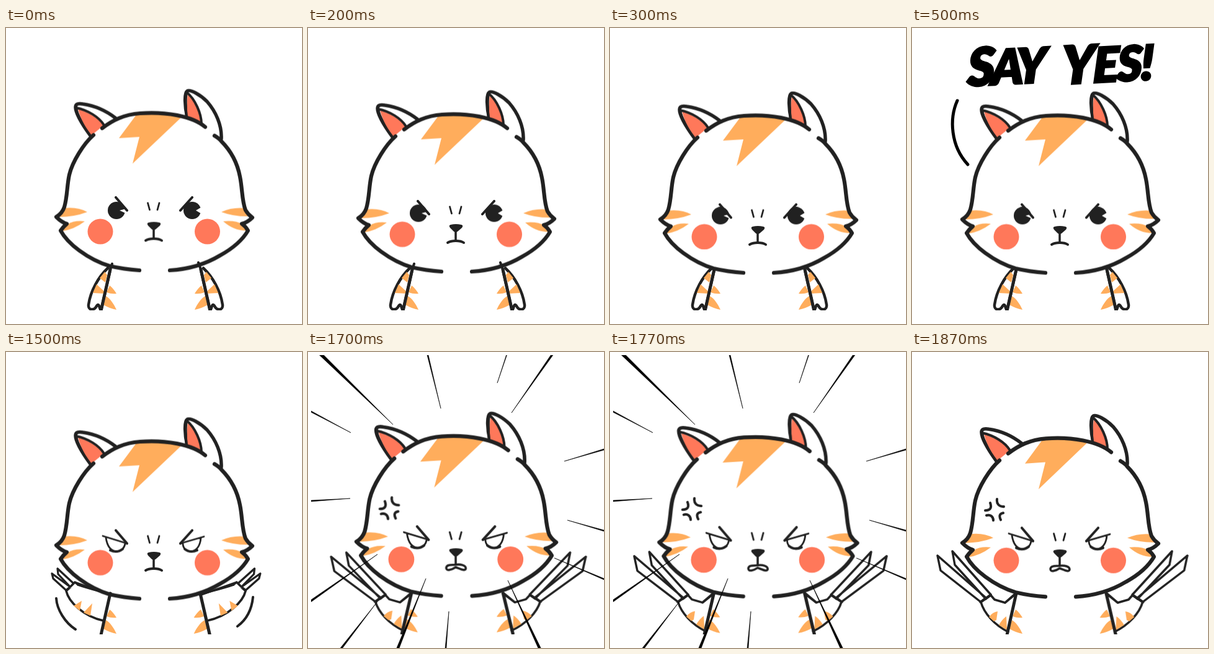
An HTML page that plays this animation: 477 by 477 pixels, repeating every 2870 ms.

```html
<!DOCTYPE html>
<html lang="en">
<head>
<meta charset="utf-8">
<title>Say yes</title>
<style>
html, body { margin: 0; width: 100%; height: 100%; overflow: hidden; background: #fff; }
svg { display: block; width: 100vw; height: 100vh; }
g { animation: 2870ms step-end infinite; }

.line { fill: none; stroke: #212121; stroke-linecap: round; stroke-linejoin: round; }
.ink { fill: #212121; }
.skin { fill: #fff; stroke: #212121; stroke-linecap: round; stroke-linejoin: round; }
.orange { fill: #ffad5c; }
.coral { fill: #ff785a; }
.words text { font: italic 900 85px Lato, "Open Sans", sans-serif; stroke: #000; stroke-width: 3; letter-spacing: -3px; }
.words .tight { letter-spacing: -6px; }
.words tspan { font-size: 78px; }

.calm { animation-name: calm; }
.swing { animation-name: swing; }
.fierce { animation-name: fierce; }
.closed { animation-name: closed; }
.squint { animation-name: squint; }
.words { animation-name: words; }
.rays { animation-name: rays; }
.high { animation-name: high; }
.head { animation-name: head; }
.face { animation-name: face; }
.nose { animation-name: nose; }
.brow { animation-name: brow; }
.arms { animation-name: arms; }

@keyframes calm { 0% { visibility: visible } 52.2648%, 100% { visibility: hidden } }
@keyframes swing { 0% { visibility: hidden } 52.2648% { visibility: visible } 59.2334%, 100% { visibility: hidden } }
@keyframes fierce { 0% { visibility: hidden } 59.2334%, 100% { visibility: visible } }
@keyframes closed { 0% { visibility: visible } 59.2334%, 100% { visibility: hidden } }
@keyframes squint { 0% { visibility: hidden } 52.2648%, 100% { visibility: visible } }
@keyframes words { 0% { visibility: hidden } 17.4216% { visibility: visible } 52.2648%, 100% { visibility: hidden } }
@keyframes rays { 0% { visibility: hidden } 59.2334% { visibility: visible } 65.1567%, 100% { visibility: hidden } }
@keyframes high { 0% { visibility: visible } 10.4529%, 100% { visibility: hidden } }

@keyframes head {
  0% { transform: translateY(-3.5px) }
  6.9686% { transform: translateY(-1.5px) }
  10.4529% { transform: translateY(.5px) }
  52.2648% { transform: translateY(3.5px) }
  59.2334% { transform: matrix(1.019, 0, 0, 1.0157, -4.53, -7.2) }
  61.6724% { transform: matrix(1.01, 0, 0, 1.012, -2.4, -5) }
  65.1567%, 100% { transform: matrix(1, 0, 0, 1.008, 0, -2.8) }
}
@keyframes face { 0% { transform: translateY(-4.5px) } 6.9686% { transform: translateY(-2px) } 10.4529%, 100% { transform: none } }
@keyframes nose { 0% { transform: translateY(-2px) } 6.9686% { transform: translateY(-.5px) } 10.4529%, 100% { transform: translateY(.5px) } }
@keyframes brow { 0% { transform: translateY(-3px) } 6.9686% { transform: translateY(-1.5px) } 10.4529%, 100% { transform: none } }
@keyframes arms {
  0% { transform: none }
  59.2334% { transform: matrix(1.019, 0, 0, .968, -4.53, 12.3) }
  61.6724% { transform: matrix(1.01, 0, 0, .984, -2.4, 6.2) }
  65.1567%, 100% { transform: none }
}
</style>
</head>
<body>
<svg viewBox="0 0 477 477">
<defs>
  <clipPath id="floor"><path d="M0 0H477V455H0Z"/></clipPath>
  <clipPath id="inset"><path d="M5 5H477V477H5Z"/></clipPath>

  <g id="side">
    <path class="orange" d="M167 415C171 418 175 423 178 428Q170 429 162 426ZM161 432C168 436 174 445 178 454Q167 452 157 446Z"/>
    <path class="line" stroke-width="5" d="M168 389L153 456"/>
  </g>
  <g id="armDown">
    <path class="skin" stroke-width="4.500" d="M164 387C149 401 136 424 133 446C132 455 142 456 146 448Q149 443 151 451L153 456L168 390"/>
    <path class="orange" d="M151 403L159 393L163 398L160 410ZM140 427L146 413L160 426L159 428Z"/>
    <use href="#side"/>
  </g>
  <g id="armUp">
    <path class="skin" stroke-width="3.500" d="M168 391C148 383 128 381 111 373L97 385C101 403 125 426 157 433"/>
    <path class="line" stroke-width="3" d="M111 371L166 391"/>
    <path class="orange" d="M109 409L122 401L119 417ZM125 420L139 405L136 425Z"/>
    <path class="skin" stroke-width="3.200" d="M83 349L84 358L104 379L110 374ZM74 357L76 365L97 384L104 379Z"/>
    <path class="skin" stroke-width="3.500" d="M97 384L105 377L111 371L116 375"/>
    <use href="#side"/>
  </g>
  <g id="armClaw">
    <path class="skin" stroke-width="3.500" d="M168 388L150 404L133 399L127 392L111 403C116 421 133 440 155 451"/>
    <path class="orange" d="M124 427Q130 419 138 418L136 432L132 434ZM140 440Q145 431 152 426L153 448Z"/>
    <path class="skin" stroke-width="3.400" d="M65 321L69 343L119 398L127 391ZM41 328L46 352L111 403L119 396Z"/>
    <path class="line" stroke-width="3.500" d="M110 403L127 391M150 404L166 391"/>
    <use href="#side"/>
  </g>
</defs>

<g clip-path="url(#floor)">
  <g class="arms">
    <g class="calm"><use href="#armDown"/><use href="#armDown" transform="matrix(-1 0 0 1 482 0)"/></g>
    <g class="swing">
      <use href="#armUp"/><use href="#armUp" transform="matrix(-1.030 0 0 1 486 0)"/>
      <path class="line" stroke-width="4" d="M81 397C82 415 95 436 112 447M398 395C396 415 388 431 373 442"/>
    </g>
    <g class="fierce"><use href="#armClaw"/><use href="#armClaw" transform="matrix(-1.030 0 0 1 486 0)"/></g>
  </g>
</g>
<g class="high"><path class="line" stroke-width="4" d="M168 389L171 380M314 389L310 378"/></g>

<g class="head">
  <path class="skin" stroke-width="5.500" d="M136 177C128 166 112 142 112 131C112 125 118 125 124 126C145 129 163 138 177 149"/>
  <path class="skin" stroke-width="5.500" d="M292 147C288 130 287 108 292 105C297 102 313 111 324 122C338 138 348 160 347 182"/>
  <path class="coral" d="M116 134C120 150 130 167 137 177L158 160C148 147 130 139 116 134ZM293 109C291 125 292 138 293 148L315 158C314 140 304 115 293 109Z"/>
  <path class="line" stroke-width="4" d="M136 177C126 164 115 146 113 132C132 136 150 147 158 160M291 147C289 132 289 118 291 107C305 118 315 142 315 158"/>

  <path class="orange" d="M211 142Q250 138 282 148L204 222L215 179L182 181Z"/>
  <path class="orange" d="M92 294Q115 291 131 300Q110 308 86 308ZM127 315Q110 313 99 320L90 331Q110 328 127 315ZM347 300Q365 292 385 294L394 307Q368 308 347 300ZM350 315Q370 313 381 320L389 330Q368 331 350 315Z"/>

  <path class="line" stroke-width="6.200" d="M141 176C125 190 107 219 102 240C98 258 99 275 94 292C91 301 86 305 81 308Q90 317 98 319Q92 324 88 330C94 341 103 351 118 362C133 373 150 382 167 387C184 391 200 393 215 394"/>
  <path class="line" stroke-width="6.200" d="M155 165C172 152 190 143 216 141C256 138 300 145 321 163"/>
  <path class="line" stroke-width="6.200" d="M336 177C341 180 345 183 347 186C364 203 373 222 377 243C381 262 380 282 386 297Q390 304 397 309Q389 317 380 319Q386 323 390 330C380 347 365 359 345 370C325 382 300 392 264 394"/>

  <g class="face">
    <circle class="coral" cx="152" cy="336" r="20.5"/>
    <circle class="coral" cx="324.500" cy="336" r="20.5"/>
    <g class="calm">
      <circle class="ink" cx="178" cy="302" r="14"/>
      <circle class="ink" cx="300" cy="302" r="14"/>
      <path fill="#fff" d="M183 302L194 299V307ZM306 302L316 296V308Z"/>
    </g>
    <g class="squint">
      <path class="line" stroke-width="2.800" d="M156 293L195 305M319 294L281 305M161 296C163 309 169 317 178 318C186 318 191 312 192 305M285 305C285 312 290 318 298 318C307 317 313 309 314 296"/>
      <path class="line" stroke-width="4" d="M168 316Q179 321 188 314M288 314Q297 321 308 316"/>
    </g>
    <g class="brow">
      <path class="line" stroke-width="4" d="M177 284L195 305M300 284L281 305"/>
      <path class="line" stroke-width="2.800" d="M228.500 293L231.500 304M247 293L244 304"/>
    </g>
  </g>

  <g class="nose">
    <path class="ink" d="M230 319Q238 317 247 319Q251 320 248 324L241 330Q238 332 235 330L229 324Q226 320 230 319Z"/>
    <path class="line" stroke-width="3.500" d="M238 328V344"/>
    <g class="closed"><path class="line" stroke-width="3.800" d="M225 348Q230 345 238 345Q247 345 251 348"/></g>
    <g class="fierce"><path class="skin" stroke-width="3.500" d="M223 349C224 343 232 345 238 344C246 343 254 345 254 350C253 355 246 351 238 348C232 352 223 355 223 349Z"/></g>
  </g>

  <g class="fierce">
    <path class="line" stroke-width="4" d="M126 244C129 252 126 256 118 256M137 238C136 245 140 250 148 250M120 264C126 262 131 266 131 272M147 260C141 261 140 265 143 271"/>
  </g>
</g>

<g class="rays" clip-path="url(#inset)"><path id="rays"/></g>

<g class="words">
  <text class="tight" transform="translate(89 94) rotate(-3) skewX(-4)">S<tspan>AY</tspan></text>
  <text transform="translate(241 91) rotate(-3) skewX(-4)">Y<tspan>ES!</tspan></text>
  <path fill="none" stroke="#000" stroke-width="5" stroke-linecap="round" d="M73 117C60 146 62 190 90 220"/>
</g>
</svg>
<script>
// Tapered streaks: outer x, y, inner x, y, outer width
const streaks = [
  [22, 5, 137, 117, 5], [193, 5, 214, 91, 2], [320, 5, 305, 50, 1], [393, 5, 328, 98, 3],
  [5, 96, 69, 130, 2], [5, 240, 68, 236, 2], [477, 157, 413, 176, 2], [477, 288, 418, 271, 2],
  [477, 366, 397, 332, 2], [5, 401, 112, 326, 3], [54, 477, 112, 402, 3], [145, 477, 190, 365, 4],
  [222, 477, 227, 418, 2], [373, 477, 322, 368, 4]
];
const wedge = ([x, y, tx, ty, w]) => {
  const len = Math.hypot(tx - x, ty - y);
  const nx = (ty - y) / len * w / 2, ny = (x - tx) / len * w / 2;
  const ox = x + (x - tx) * 4 / len, oy = y + (y - ty) * 4 / len;
  return `M${ox + nx} ${oy + ny}L${tx} ${ty}L${ox - nx} ${oy - ny}Z`;
};
const rays = document.getElementById("rays");
rays.setAttribute("d", streaks.map(wedge).join(""));
rays.setAttribute("stroke", "#000");
rays.setAttribute("stroke-width", ".6");
</script>
</body>
</html>
```
